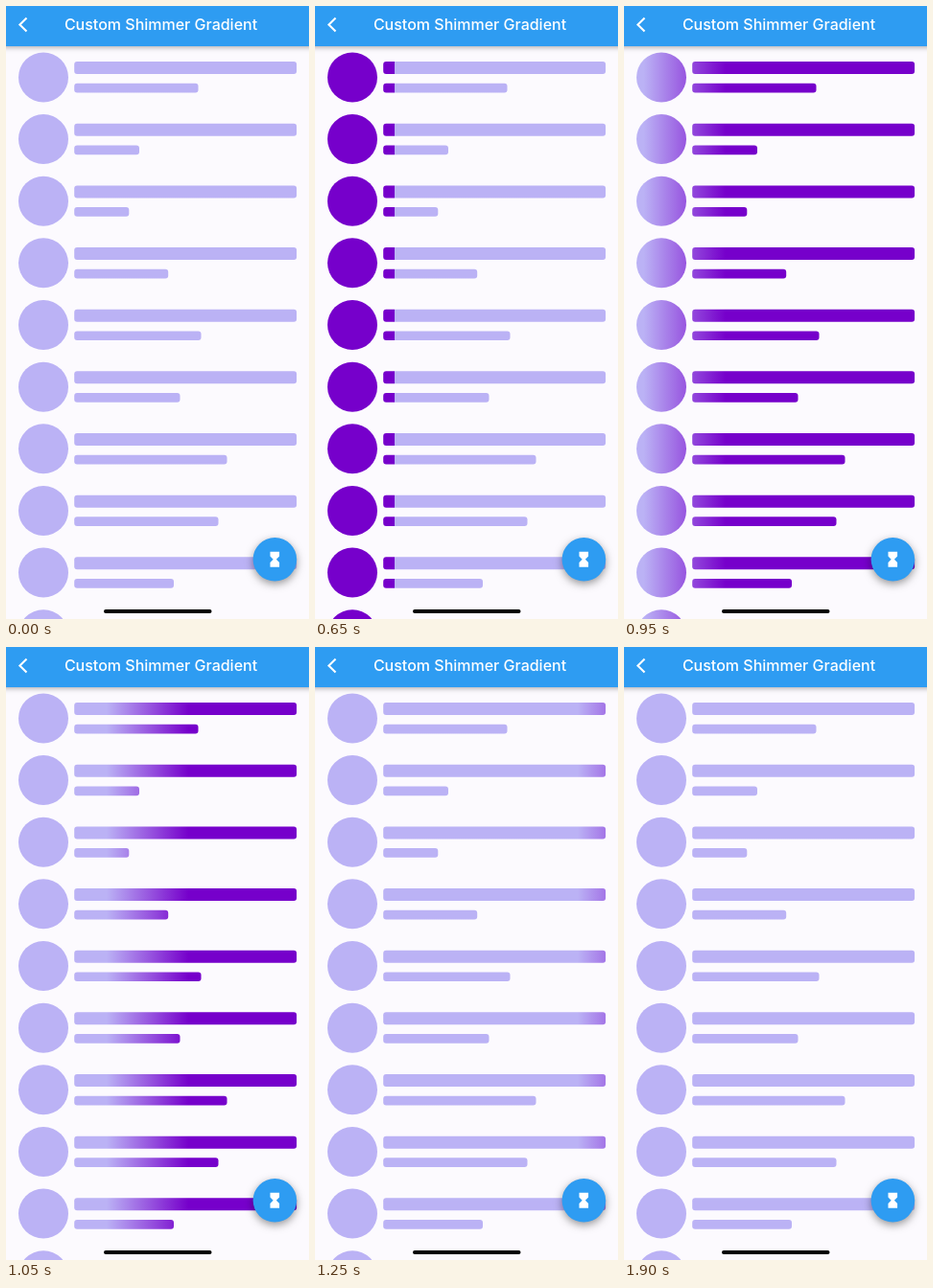
Recreate the animation shown at these times as an HTML page with a canvas. Size 316 by 640 pixels, loop 1.95 s.

```html
<!DOCTYPE html>
<html lang="en">
<head>
<meta charset="utf-8">
<title>Custom Shimmer Gradient</title>
<style>
  html, body { margin: 0; width: 100%; height: 100%; overflow: hidden; background: #fcfafe; }
  canvas { display: block; width: 316px; height: 640px; }
</style>
</head>
<body>
<canvas id="stage" width="316" height="640"></canvas>
<script>
const ctx = document.getElementById('stage').getContext('2d');
const WIDTH = 316, HEIGHT = 640;
const LOOP = 1950, STEP = 50;
const BLUE = '#2e9cf2', LIGHT = '#bbb2f5', DARK = '#7600cb', PAPER = '#fcfafe';
const ROW_PITCH = 64.65;
const shortBarEnds = [200.5, 139, 128.3, 169.2, 203.5, 181.5, 230.5, 221.5, 175];
const hourglass = new Path2D('M6 2v6h.01L6 8.01 10 12l-4 4 .01.01H6V22h12v-5.99h-.01L18 16l-4-4 4-3.99-.01-.01H18V2z');

function bar(x, y, w, h, r) {
  ctx.beginPath();
  ctx.roundRect(x, y, w, h, r);
  ctx.fill();
}

function disc(x, y, r) {
  ctx.beginPath();
  ctx.arc(x, y, r, 0, Math.PI * 2);
  ctx.fill();
}

function withShadow(color, blur, offset, draw) {
  ctx.save();
  ctx.shadowColor = color;
  ctx.shadowBlur = blur;
  ctx.shadowOffsetY = offset;
  draw();
  ctx.restore();
}

// A sharp front edge, a solid band, then a soft tail back to the base colour.
function shimmer(time) {
  const length = 316, front = 83 + 0.845 * (time - 650);
  const fill = ctx.createLinearGradient(front - length, 0, front, 0);
  fill.addColorStop(0, LIGHT);
  fill.addColorStop(0.27, DARK);
  fill.addColorStop(1, DARK);
  fill.addColorStop(1, LIGHT);
  return fill;
}

function drawList(time) {
  ctx.fillStyle = shimmer(time);
  for (let row = 0; row < 10; row++) {
    const y = row * ROW_PITCH;
    disc(39, 74.4 + y, 26);
    if (row === shortBarEnds.length) break;
    bar(71.2, 58.1 + y, 231.9, 13, 3);
    bar(71.2, 80.8 + y, shortBarEnds[row] - 71.2, 9.7, 3);
  }
}

function drawHeader() {
  ctx.fillStyle = BLUE;
  withShadow('rgba(0,0,0,.3)', 5, 1.5, () => ctx.fillRect(-10, -10, WIDTH + 20, 52));
  ctx.strokeStyle = '#fff';
  ctx.lineWidth = 2.1;
  ctx.beginPath();
  ctx.moveTo(21.5, 12.4);
  ctx.lineTo(14.4, 19.5);
  ctx.lineTo(21.5, 26.6);
  ctx.stroke();
  ctx.fillStyle = '#fff';
  ctx.font = '500 16px Inter, Roboto, sans-serif';
  ctx.textAlign = 'center';
  ctx.fillText('Custom Shimmer Gradient', 161.5, 25);
}

function drawButton() {
  ctx.fillStyle = BLUE;
  withShadow('rgba(0,0,0,.4)', 8, 3, () => disc(280.4, 577.8, 22.8));
  ctx.save();
  ctx.translate(270.7, 568.2);
  ctx.scale(0.8, 0.8);
  ctx.fillStyle = '#fff';
  ctx.fill(hourglass);
  ctx.restore();
}

function render(now) {
  const time = Math.floor((now % LOOP) / STEP) * STEP;
  ctx.fillStyle = PAPER;
  ctx.fillRect(0, 0, WIDTH, HEIGHT);
  drawList(time);
  drawHeader();
  drawButton();
  ctx.fillStyle = '#000';
  bar(102, 630, 112.5, 4, 2);
}

const start = performance.now();
function tick() {
  render(performance.now() - start);
  requestAnimationFrame(tick);
}
tick();
</script>
</body>
</html>
```
